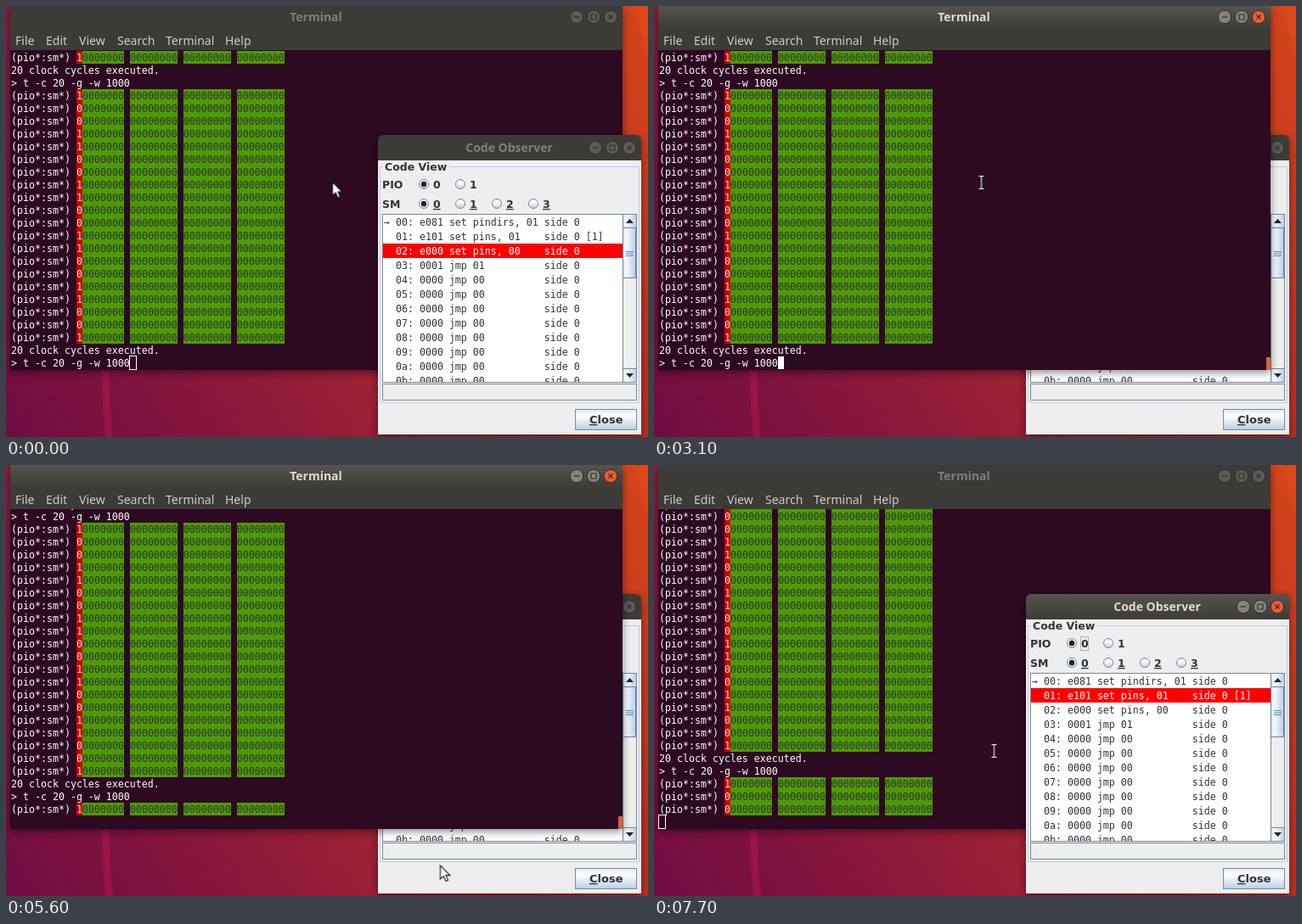
Write an HTML page that moves like this. It is 756 px wide and 508 px high and loops after 8000 ms.

```html
<!DOCTYPE html>
<html lang="en">
<head>
<meta charset="utf-8">
<title>Terminal and Code Observer</title>
<style>
  html, body { margin: 0; width: 100%; height: 100%; overflow: hidden; background: #8c1a38; }
  svg { position: absolute; left: 0; top: 0; width: 756px; height: 508px; overflow: hidden; }
  text { white-space: pre; }
  .window { filter: drop-shadow(0 3px 5px rgba(0, 0, 0, .45)); }
  .mono { font: 11.627px "DejaVu Sans Mono", monospace; }
  .title { font: bold 14px "Noto Sans", "Open Sans", sans-serif; text-anchor: middle; }
  .menu { font: 14px "Noto Sans", "Open Sans", sans-serif; fill: #d0ccc4; }
  .label { font: bold 12.5px "DejaVu Sans", sans-serif; fill: #333; }
  .key { text-decoration: underline; }
</style>
</head>
<body>
<svg id="wall" viewBox="0 0 756 508">
  <defs>
    <linearGradient id="sky" gradientUnits="userSpaceOnUse" x1="0" y1="508" x2="756" y2="0">
      <stop offset="0" stop-color="#700b43"/>
      <stop offset=".2" stop-color="#82143d"/>
      <stop offset=".42" stop-color="#9b2034"/>
      <stop offset=".7" stop-color="#b93025"/>
      <stop offset="1" stop-color="#d5451a"/>
    </linearGradient>
    <linearGradient id="bar" x2="0" y2="1">
      <stop offset="0" stop-color="#55544d"/><stop offset="1" stop-color="#3c3b37"/>
    </linearGradient>
    <linearGradient id="metal" x2="0" y2="1">
      <stop offset="0" stop-color="#dde8f3"/><stop offset=".3" stop-color="#fff"/>
      <stop offset="1" stop-color="#b8cfe5"/>
    </linearGradient>
    <linearGradient id="thumb">
      <stop offset="0" stop-color="#dde8f3"/><stop offset=".3" stop-color="#f4f8fc"/>
      <stop offset="1" stop-color="#b8cfe5"/>
    </linearGradient>
    <clipPath id="screen"><rect x="5" y="52" width="721" height="377"/></clipPath>
    <clipPath id="list"><rect x="444" y="246" width="282" height="197"/></clipPath>
  </defs>
  <rect width="756" height="508" fill="url(#sky)"/>
  <path d="M738 0H756V60Z" fill="#e04d1a" opacity=".45"/>
  <path d="M117 420Q117 468 122 512" fill="none" stroke="#a3154a" stroke-width="9" opacity=".75"/>
</svg>
<svg id="term" class="window" viewBox="0 0 756 508"></svg>
<svg id="dialog" class="window" viewBox="0 0 756 508"></svg>
<svg id="mouse" viewBox="0 0 756 508" style="z-index:9"></svg>

<script>
const LOOP = 8000;
const $ = id => document.getElementById(id);

function add(parent, tag, attrs = {}, content) {
  const el = document.createElementNS('http://www.w3.org/2000/svg', tag);
  for (const name in attrs) el.setAttribute(name, attrs[name]);
  if (content !== undefined) el.textContent = content;
  return parent.appendChild(el);
}
const group = (parent, attrs) => add(parent, 'g', attrs);
const rect = (parent, x, y, width, height, fill, more) =>
  add(parent, 'rect', { x, y, width, height, fill, ...more });
const frame = (parent, x, y, w, h, stroke, fill = 'none') =>
  rect(parent, x + .5, y + .5, w - 1, h - 1, fill, { stroke });
const path = (parent, d, fill, more) => add(parent, 'path', { d, fill, ...more });
const write = (parent, cls, x, y, content, more) =>
  add(parent, 'text', { class: cls, x, y, ...more }, content);

// Holds each value from its time until the next one.
function track(el, prop, steps) {
  const keys = steps.map(([time, value]) => ({ offset: time / LOOP, [prop]: value, easing: 'steps(1, end)' }));
  keys.push({ offset: 1, [prop]: steps.at(-1)[1] });
  el.animate(keys, { duration: LOOP, iterations: Infinity });
}
const show = (el, from, to) => {
  const steps = from > 0 ? [[0, 0], [from, 1]] : [[0, 1]];
  if (to < LOOP) steps.push([to, 0]);
  track(el, 'opacity', steps);
};
const move = (el, steps) =>
  track(el, 'transform', steps.map(([time, x, y]) => [time, `translate(${x}px, ${y}px)`]));

function titleBar(parent, shape, title, cx, y, buttons, focus) {
  const draw = active => {
    const g = group(parent);
    path(g, shape, active ? 'url(#bar)' : '#3c3b37');
    write(g, 'title', cx, y + 5, title, { fill: active ? '#dfdbd2' : '#807d78' });
    buttons.forEach((x, i) => {
      const hot = active && i === 2;
      add(g, 'circle', {
        cx: x, cy: y, r: 7.7, stroke: '#2f2e2a',
        fill: hot ? '#ee5a31' : active ? '#85837a' : '#5b5a54'
      });
      const icon = ['M-3.5 0h7', 'M-3-3h6v6h-6z', 'M-2.5-2.5l5 5m0-5l-5 5'][i];
      path(g, icon, 'none', { stroke: '#32312d', 'stroke-width': 1.2, transform: `translate(${x} ${y})` });
    });
    return g;
  };
  draw(false);
  show(draw(true), ...focus);
}

// Terminal
const TERM_FOCUS = [3100, 6000];
const NEW_LINES = [5200, 6400, 7700];

function buildTerminal(term) {
  rect(term, 5, 26, 721, 26, '#3c3b37');
  titleBar(term, 'M5 0H726V27H5Z', 'Terminal', 365, 13, [672, 692, 712], TERM_FOCUS);
  [['File', 11], ['Edit', 47], ['View', 86], ['Search', 131], ['Terminal', 188], ['Help', 258]]
    .forEach(([name, x]) => write(term, 'menu', x, 46, name));
  rect(term, 5, 52, 721, 377, '#2d0922');

  const clip = group(term, { 'clip-path': 'url(#screen)' });
  const lines = group(clip);
  let row = 0;
  const plain = content => write(lines, 'mono', 6, 65 + 15 * row++, content, { fill: '#fff' });
  const pins = i => {
    const y = 53 + 15 * row++, g = group(lines);
    write(g, 'mono', 6, y + 12, '(pio*:sm*)', { fill: '#fff' });
    [83, 146, 209, 272].forEach(x => rect(g, x, y, 56, 15, '#4e9a06'));
    rect(g, 83, y, 7, 15, '#cc0000');
    write(g, 'mono', 83, y + 12, i % 4 % 3 ? 0 : 1, { fill: '#f4dcd8' });
    write(g, 'mono', 90, y + 12, '0000000' + ' 00000000'.repeat(3), { fill: '#2e3436' });
    return g;
  };
  const done = () => plain('20 clock cycles executed.');
  const command = () => plain('> t -c 20 -g -w 1000');

  pins(19); done(); command();
  for (let i = 0; i < 20; i++) pins(i);
  done(); command();
  NEW_LINES.forEach((time, i) => show(pins(i), time, LOOP));
  move(lines, [0, 5000, ...NEW_LINES].map((time, i) => [time, 0, -15 * i]));

  const caret = group(clip);
  const solid = rect(caret, 0, 413, 7, 15, '#fff');
  const hollow = frame(caret, -1, 412, 9, 17, '#fff');
  move(caret, [[0, 146, 0], [5000, 6, 0]]);
  track(solid, 'opacity', [[0, 0], [3000, 1], [4000, 0], [4200, 1], [5600, 0]]);
  track(hollow, 'opacity', [[0, 1], [3000, 0], [5900, 1]]);

  rect(term, 721, 414, 5, 15, '#8f8b8a');
  show(rect(term, 721, 414, 5, 15, '#d9623f'), ...TERM_FOCUS);
  track(term, 'zIndex', [[0, 1], [3000, 3], [5900, 1]]);
}

// Code Observer
const EDGE = '#7a8a99';

function radio(parent, cx, cy, name, on, key) {
  add(parent, 'circle', { cx, cy, r: 5.5, fill: 'url(#metal)', stroke: EDGE });
  if (on) add(parent, 'circle', { cx, cy, r: 3.2, fill: '#222' });
  write(parent, key ? 'label key' : 'label', cx + 11, cy + 5, name);
}

function buildList(dialog) {
  frame(dialog, 443, 245, 300, 199, EDGE, '#fff');
  const list = group(dialog, { 'clip-path': 'url(#list)' });
  const program = [['e081', 'set pindirs, 01'], ['e101', 'set pins, 01', ' [1]'], ['e000', 'set pins, 00'], ['0001', 'jmp 01']];
  const lit = { 1: [7700, LOOP], 2: [0, 6400], 3: [6400, 7700] };
  for (let i = 0; i < 12; i++) {
    const [word, code, delay = ''] = program[i] || ['0000', 'jmp 00'];
    const address = i.toString(16).padStart(2, '0');
    const line = `${i ? ' ' : '→'} ${address}: ${word} ${code.padEnd(15)} side 0${delay}`;
    const y = 246 + 17 * i;
    write(list, 'mono', 445, y + 13, line, { fill: '#333' });
    if (lit[i]) {
      const g = group(list);
      rect(g, 444, y, 282, 17, '#f00');
      write(g, 'mono', 445, y + 13, line, { fill: '#fff' });
      show(g, ...lit[i]);
    }
  }
  frame(dialog, 726, 245, 17, 199, EDGE, '#eee');
  frame(dialog, 726, 245, 17, 17, EDGE, 'url(#thumb)');
  frame(dialog, 726, 427, 17, 17, EDGE, 'url(#thumb)');
  frame(dialog, 726, 261, 16, 60, '#6382bf', 'url(#thumb)');
  path(dialog, 'M730 256h9l-4.5-5zM730 433h9l-4.5 5z', '#222');
  path(dialog, 'M730 289.5h9m-9 2.5h9m-9 2.5h9', 'none', { stroke: '#6382bf' });
}

function buildDialog(dialog) {
  titleBar(dialog, 'M438 183V159Q438 152 445 152H741Q748 152 748 159V183Z',
    'Code Observer', 592.5, 167, [694, 714, 734], [6000, LOOP]);
  rect(dialog, 438, 182, 310, 323, '#eee');
  path(dialog, 'M444 189.5H440.5V467.5H745.5V189.5H522', 'none', { stroke: '#b8cfe5' });
  write(dialog, 'label', 446, 194, 'Code View');
  write(dialog, 'label', 443, 215, 'PIO');
  write(dialog, 'label', 443, 238, 'SM');
  for (let i = 0; i < 4; i++) {
    if (i < 2) radio(dialog, 492 + 43 * i, 210, i, !i, false);
    radio(dialog, 492 + 43 * i, 233, i, !i, true);
  }
  show(frame(dialog, 502, 202, 10, 17, '#a3b8cc'), 6000, LOOP);

  buildList(dialog);

  frame(dialog, 443, 445, 300, 20, EDGE, '#eee');
  frame(dialog, 670, 475, 73, 25, EDGE, 'url(#metal)');
  const close = write(dialog, 'label', 687, 492, undefined, { style: 'font-size:13px' });
  add(close, 'tspan', { class: 'key' }, 'C');
  add(close, 'tspan', {}, 'lose');
  dialog.style.zIndex = 2;
}

// Pointer
function buildMouse(mouse) {
  const arrow = group(mouse), beam = group(mouse);
  path(arrow, 'M0 0V16L3.7 12.6 6.4 18.6 9 17.4 6.5 11.6H11.3Z', '#fff', { stroke: '#111', 'stroke-width': 1.1 });
  const bars = 'M-3-7.5H-1L0-6.5 1-7.5H3M0-6.5V6.5M-3 7.5H-1L0 6.5 1 7.5H3';
  path(beam, bars, 'none', { stroke: '#111', 'stroke-width': 2.6 });
  path(beam, bars, 'none', { stroke: '#fff', 'stroke-width': 1.1 });

  move(arrow, [[0, 384.5, 207.5], [5400, 558, 442], [5500, 530, 462], [5600, 511.5, 472],
    [6300, 500, 455], [6400, 450, 395], [6500, 410, 347], [6600, 398.5, 331.5]]);
  track(arrow, 'opacity', [[0, 1], [500, 0], [5400, 1], [6800, 0]]);
  move(beam, [[0, 385.5, 208], [5200, 430, 290], [5300, 510, 390], [5400, 400.5, 337]]);
  track(beam, 'opacity', [[0, 0], [500, 1], [4500, 0], [5200, 1], [5400, 0], [6800, 1]]);
}

buildTerminal($('term'));
buildDialog($('dialog'));
buildMouse($('mouse'));
</script>
</body>
</html>
```
